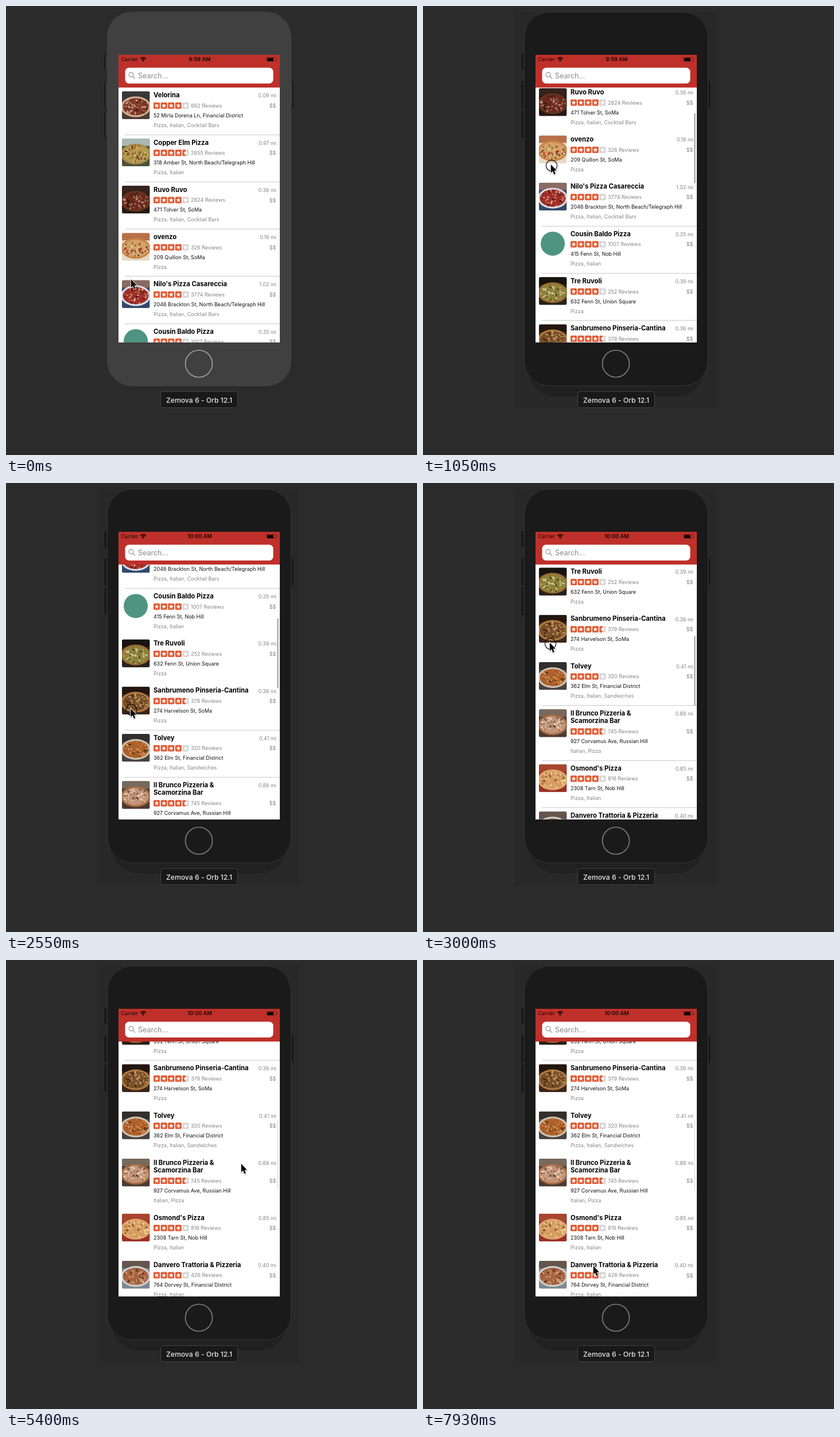
An HTML page with a canvas that plays this animation: 716 by 782 pixels, repeating every 8 s.

```html
<!DOCTYPE html>
<html lang="en">
<head>
<meta charset="utf-8">
<title>Restaurant list</title>
<style>
html, body { margin: 0; width: 100%; height: 100%; overflow: hidden; background: #2b2b2b; }
canvas { display: block; width: 716px; height: 782px; }
</style>
</head>
<body>
<canvas id="stage" width="716" height="782"></canvas>
<script>
const ctx = document.getElementById('stage').getContext('2d');
const FONT = 'Inter, "Liberation Sans", sans-serif';
const LOOP = 8000, STEP = 150, TAU = Math.PI * 2;
const LIST_TOP = 142, ROW = 82.25, EXTRA = 13.5;

// Photo colours: backdrop, upper band, rim, filling, accent
const rows = [
  { title: 'Velorina', stars: 4, reviews: 662, miles: '0.09', street: '52 Mirla Dorena Ln, Financial District',
    tags: 'Pizza, Italian, Cocktail Bars', photo: '#4b3b33 #39383a #d5b096 #7e3a28 #d9a184' },
  { title: 'Copper Elm Pizza', stars: 4.5, reviews: 2655, miles: '0.97', street: '318 Amber St, North Beach/Telegraph Hill',
    tags: 'Pizza, Italian', photo: '#4b5239 #a9b8b4 #a98c4c #b59a4e #8b3b24' },
  { title: 'Ruvo Ruvo', stars: 4, reviews: 2824, miles: '0.36', street: '471 Tolver St, SoMa',
    tags: 'Pizza, Italian, Cocktail Bars', photo: '#261914 #35221b #63341f #6b2a1e #b98a6c' },
  { title: 'ovenzo', stars: 4, reviews: 326, miles: '0.19', street: '209 Quillon St, SoMa',
    tags: 'Pizza', photo: '#e8d9c6 #b8704a #c98545 #d3a266 #a63a25' },
  { title: "Nilo's Pizza Casareccia", stars: 4, reviews: 3774, miles: '1.02', street: '2046 Brackton St, North Beach/Telegraph Hill',
    tags: 'Pizza, Italian, Cocktail Bars', photo: '#33496c #8a6a62 #dcdfe6 #a12f27 #dc9a88' },
  { title: 'Cousin Baldo Pizza', stars: 4, reviews: 1007, miles: '0.35', street: '415 Fenn St, Nob Hill', tags: 'Pizza, Italian' },
  { title: 'Tre Ruvoli', stars: 4, reviews: 252, miles: '0.39', street: '632 Fenn St, Union Square',
    tags: 'Pizza', photo: '#2c2119 #17130f #9a6d35 #8d8139 #d0c890' },
  { title: 'Sanbrumeno Pinseria-Cantina', stars: 4.5, reviews: 379, miles: '0.36', street: '274 Harvelson St, SoMa',
    tags: 'Pizza', photo: '#3c2618 #23160e #b47d43 #7a4f29 #c59752' },
  { title: 'Tolvey', stars: 4, reviews: 320, miles: '0.41', street: '362 Elm St, Financial District',
    tags: 'Pizza, Italian, Sandwiches', photo: '#49423d #332f2d #cfc5b8 #ae6029 #d18a45' },
  { title: 'Il Brunco Pizzeria &\nScamorzina Bar', stars: 4.5, reviews: 745, miles: '0.88', street: '927 Corvamus Ave, Russian Hill',
    tags: 'Italian, Pizza', photo: '#4d3b31 #78695d #a56b43 #c39478 #e9d5bd' },
  { title: "Osmond's Pizza", stars: 4, reviews: 816, miles: '0.85', street: '2308 Tarn St, Nob Hill',
    tags: 'Pizza, Italian', photo: '#9c3128 #a8452f #e0aa6e #d69a5c #f0d19a' },
  { title: 'Danvero Trattoria & Pizzeria', stars: 4, reviews: 426, miles: '0.40', street: '764 Dorvey St, Financial District',
    tags: 'Pizza, Italian', photo: '#7d8a90 #66554c #cfd2d4 #a8633f #cf9472' },
];
let total = 0;
for (const r of rows) {
  r.lines = r.title.split('\n');
  r.shift = (r.lines.length - 1) * EXTRA;
  r.top = total;
  total += ROW + r.shift;
}

// A finger drags at even speed, then the list glides to rest.
const swipes = [
  { press: 300, move: 440, lift: 1200, drag: 211.6, glide: 51 },
  { press: 2100, move: 2165, lift: 3000, drag: 232, glide: 48.1 },
];
const pointerPath = [[0, 217, 478], [450, 219, 437], [1050, 222, 278], [1500, 210, 357], [2100, 214, 510],
  [3000, 220, 280], [4200, 258, 288], [4950, 414, 379], [5400, 409, 357], [6150, 249, 379], [6450, 249, 379],
  [6900, 348, 400], [7500, 246, 520], [7950, 296, 535]];

const clamp = v => Math.max(0, Math.min(1, v));

function travel(s, t) {
  const time = s.lift - s.move, rest = 2 * s.glide * time / s.drag;
  const k = clamp((t - s.lift) / rest);
  return s.drag * clamp((t - s.move) / time) + s.glide * k * (2 - k);
}

// Smooth curve through the points without overshoot
function follow(path, axis, t) {
  const slope = i => path[i] && path[i + 1]
    ? (path[i + 1][axis] - path[i][axis]) / (path[i + 1][0] - path[i][0]) : 0;
  const tangent = i => {
    const a = slope(i - 1), b = slope(i);
    return a * b > 0 ? 2 * a * b / (a + b) : 0;
  };
  const i = Math.max(0, path.findIndex(p => p[0] >= t) - 1);
  const [p, q] = [path[i], path[i + 1]], d = q[0] - p[0], k = clamp((t - p[0]) / d);
  const ease = k * k * (3 - 2 * k), rest = 1 - k;
  return p[axis] + (q[axis] - p[axis]) * ease + d * k * rest * (rest * tangent(i) - k * tangent(i + 1));
}

function rand(seed) {
  return () => (seed = (seed * 16807) % 2147483647) / 2147483647;
}

function rect(x, y, w, h, color) {
  ctx.fillStyle = color;
  ctx.fillRect(x, y, w, h);
}

function round(x, y, w, h, r, fill, stroke) {
  ctx.beginPath();
  ctx.roundRect(x, y, w, h, r);
  if (fill) { ctx.fillStyle = fill; ctx.fill(); }
  if (stroke) { ctx.strokeStyle = stroke; ctx.lineWidth = 1; ctx.stroke(); }
}

function ring(x, y, r, color, width, from = 0, to = TAU) {
  ctx.beginPath();
  ctx.arc(x, y, r, from, to);
  ctx.strokeStyle = color;
  ctx.lineWidth = width;
  ctx.stroke();
}

function oval(x, y, rx, ry, color, turn = 0) {
  ctx.beginPath();
  ctx.ellipse(x, y, rx, ry, turn, 0, TAU);
  ctx.fillStyle = color;
  ctx.fill();
}

// y is the middle of the capital letters
function text(str, x, y, size, color, weight = 400, align = 'left') {
  ctx.font = `${weight} ${size}px ${FONT}`;
  ctx.textAlign = align;
  ctx.fillStyle = color;
  ctx.fillText(str, x, y + size * 0.36);
}

function drawPhoto(colors, y, seed) {
  const x = 202, size = 48.5, cx = x + 24, cy = y + 27;
  if (!colors) return oval(cx, y + 24, 21, 21, '#4f9480');
  const [back, band, rim, fill, accent] = colors.split(' '), next = rand(seed * 991);
  const specks = [accent, fill, 'rgba(0,0,0,.45)', 'rgba(255,235,210,.4)'];
  ctx.save();
  ctx.beginPath();
  ctx.roundRect(x, y, size, size, 3);
  ctx.clip();
  rect(x, y, size, size, back);
  rect(x, y, size, 13, band);
  oval(cx, cy, 26, 18, rim);
  oval(cx, cy, 22.5, 15, fill);
  for (let i = 0; i < 70; i++) {
    const a = next() * TAU, d = Math.sqrt(next()) * 0.85;
    oval(cx + Math.cos(a) * d * 25, cy + Math.sin(a) * d * 17,
      0.8 + next() * 2.2, 0.6 + next() * 1.2, specks[i % 4], a);
  }
  ctx.restore();
}

function drawStar(x, y, part) {
  const w = 11, c = w / 2;
  round(x, y, w, w, 1.6, '#d6d6d6');
  if (part > 0) round(x, y, w * part, w, 1.6, '#e4572f');
  ctx.beginPath();
  for (let i = 0; i < 10; i++) {
    const a = (i / 10 - 0.25) * TAU, r = i % 2 ? 1.8 : 4.3;
    ctx.lineTo(x + c + Math.cos(a) * r, y + c + 0.2 + Math.sin(a) * r);
  }
  ctx.fillStyle = '#fff';
  ctx.fill();
}

function drawRow(r, i, y) {
  const gray = '#858585', low = y + r.shift;
  drawPhoto(r.photo, y + 6.5, i + 1);
  r.lines.forEach((line, n) => text(line, 257, y + 13.2 + n * 13, 11.25, '#000', 700));
  text(r.miles + ' mi', 471, y + 14.2, 9, gray, 400, 'right');
  text('$$', 470.5, low + 31.7, 9.2, gray, 400, 'right');
  for (let n = 0; n < 5; n++) drawStar(257 + n * 12.6, low + 26, clamp(r.stars - n));
  text(r.reviews + ' Reviews', 322, low + 31.7, 9, gray);
  text(r.street, 257, low + 48.6, 9, '#111');
  text(r.tags, 257, low + 65.6, 9, gray);
}

function drawList(scroll, held) {
  rows.forEach((r, i) => {
    const y = LIST_TOP + r.top - scroll, line = Math.round(y + r.shift + ROW - 0.6);
    if (y < 40 || y > 586) return;
    drawRow(r, i, y);
    // Once the list has moved, dividers in the middle drop out.
    const lost = scroll > 50 && line > 212 && line < (held ? 380 : 530);
    if (!lost) rect(207, line, 270, 1, '#cbcbcb');
  });
}

function drawPhone(active) {
  rect(0, 0, 716, 782, '#2b2b2b');
  if (active) {
    rect(160, 10, 351, 690, '#282828');
    round(184, 240, 305, 440, 48, '#212121');
  }
  const side = (x, y, h) => round(x, y, 4, h, 1, active ? '#202020' : '#353535', '#050505');
  side(172.5, 84.5, 26);
  side(172.5, 132.5, 45);
  side(172.5, 183.5, 45);
  side(495.5, 132.5, 45);
  round(176.5, 10.5, 320, 651, 43, active ? '#1a1a1a' : '#404040', active ? '#363636' : '#434343');
  ring(336, 623, 23.5, active ? '#7d7d7d' : '#a0a0a0', 1.7);
  round(269.5, 671.5, 134, 28, 4, '#191919', '#434343');
  text('Zemova 6 - Orb 12.1', 336.5, 687, 12.2, '#e6e6e6', 500, 'center');
}

function drawHeader(clock) {
  const ink = '#160504';
  rect(196, 85, 281, 57, '#bf302a');
  text('Carrier', 200.5, 93, 9, ink);
  for (let r = 2.6; r < 7; r += 2.1) ring(239, 96.2, r, ink, 1.4, -TAU * 0.375, -TAU * 0.125);
  oval(239, 95.6, 1.2, 1.2, ink);
  text(clock, 337.5, 93, 9.2, ink, 600, 'center');
  round(453.5, 89.5, 17, 7, 1.6, null, '#7c221e');
  round(455, 90.5, 11, 5.5, 0.8, '#0b0202');
  rect(471.5, 91.5, 1.2, 3, '#7c221e');
  round(207.5, 107.5, 258, 27.5, 7, '#fff');
  ring(218, 119.6, 4, '#8a8a8e', 1.1);
  ctx.beginPath();
  ctx.moveTo(220.9, 122.5);
  ctx.lineTo(225, 126.6);
  ctx.stroke();
  text('Search...', 230, 121, 12.5, '#8a8a8e');
}

function drawBar(t, scroll) {
  const s = swipes.filter(s => t >= s.move).pop();
  if (!s) return;
  const top = 145.2 + scroll * 0.244;
  if (s === swipes[1]) rect(473, top, 1, 122, '#d2d2d2');
  ctx.globalAlpha = 1 - clamp((t - s.lift) / 600);
  round(472.3, top, 2.4, 122, 1.2, '#a6a6a6');
  ctx.globalAlpha = 1;
}

function drawPointer(t, held) {
  const x = follow(pointerPath, 1, t), y = follow(pointerPath, 2, t);
  if (held) ring(x + 2, y, 9.6, '#151515', 1.3);
  ctx.save();
  ctx.translate(x + 0.8, y - 1);
  ctx.beginPath();
  for (const [px, py] of [[0, -1], [0, 13.5], [3.2, 10.6], [5.6, 16.2], [8, 15.2], [5.7, 9.8], [10, 9.6]]) ctx.lineTo(px, py);
  ctx.closePath();
  ctx.shadowColor = 'rgba(0,0,0,.35)';
  ctx.shadowBlur = 2;
  ctx.shadowOffsetY = 1;
  ctx.strokeStyle = '#fff';
  ctx.lineWidth = 1.8;
  ctx.stroke();
  ctx.shadowColor = 'transparent';
  ctx.fillStyle = '#000';
  ctx.fill();
  ctx.restore();
}

function draw(time) {
  // The late steps come slightly early.
  const t = Math.floor((time + (time > 5800 ? 20 : 0)) / STEP) * STEP;
  const scroll = swipes.reduce((sum, s) => sum + travel(s, t), 0);
  const held = swipes.some(s => t >= s.press && t <= s.lift);
  drawPhone(t >= swipes[0].press);
  ctx.save();
  ctx.beginPath();
  ctx.rect(196, 85, 281, 501);
  ctx.clip();
  rect(196, 85, 281, 501, '#fff');
  drawList(scroll, held);
  drawBar(t, scroll);
  drawHeader(t < 2250 ? '9:59 AM' : '10:00 AM');
  ctx.restore();
  drawPointer(t, held);
}

const start = performance.now();
function tick() {
  draw((performance.now() - start) % LOOP);
  requestAnimationFrame(tick);
}
tick();
</script>
</body>
</html>
```
